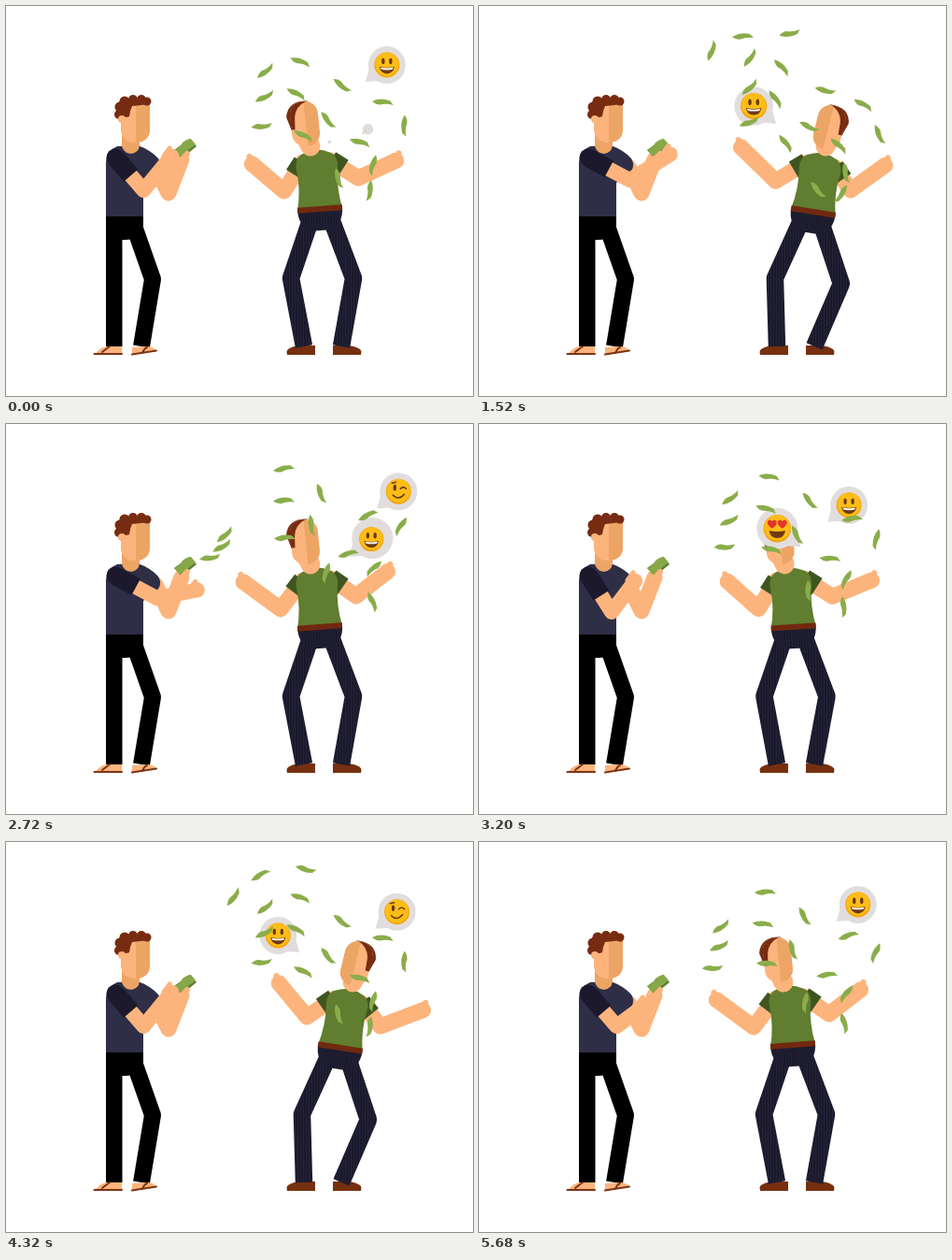
These frames come from a looping animation (500x417 px, 5.76 s). An HTML page:

```html
<!DOCTYPE html>
<html lang="en">
<head>
<meta charset="utf-8">
<title>Money shower</title>
<style>
html, body { margin: 0; width: 100%; height: 100%; overflow: hidden; background: #fff; }
svg { display: block; width: 100vw; height: 100vh; }
</style>
</head>
<body>
<svg viewBox="0 0 500 417" stroke-linecap="round" stroke-linejoin="round">
  <defs>
    <pattern id="stripe" width="3" height="6" patternUnits="userSpaceOnUse">
      <path d="M0 0h3v6h-3z" fill="#1b1a2c"/><path d="M0 0h1v6h-1z" fill="#232238"/>
    </pattern>
    <clipPath id="skull"><rect x="-15" y="-26" width="30" height="48" rx="14"/></clipPath>
  </defs>
  <rect width="500" height="417" fill="#fff"/>
  <g id="payer">
    <path d="M160 172L174 200L188 164" fill="none" stroke="#fcb47c" stroke-width="17"/>
    <path d="M107 225h40v12q-5 13 -19 13h-21z" fill="#000"/>
    <path d="M107 225h17.500v139h-17.500z" fill="#000"/>
    <path d="M138 238L157 292L145 364" fill="none" stroke="#000" stroke-width="18" stroke-linecap="butt"/>
    <path d="M96 372q4-7 12-8h16v8z" fill="#fcb47c"/>
    <path d="M94.500 372h29.500M103 370q5-4 8-6" stroke="#7b3414" stroke-width="2" fill="none"/>
    <path d="M135 372l0-7 17-1q8 1 9 5z" fill="#fcb47c"/>
    <path d="M135 372.500l26-4M146 371q2-5 5-6" stroke="#7b3414" stroke-width="2" fill="none"/>
    <path d="M107 225v-58q0-12 12-17l22-1q14 5 22 14 6 10-5 18l-11 8v36z" fill="#2e2e47"/>
    <path d="M124 138h19v11q-1 8-9 9-8-1-10-8z" fill="#eda566"/>
    <rect x="123" y="104" width="31" height="42" rx="14" fill="#fcb47c"/>
    <path d="M139 104h15v28q0 13-15 14z" fill="#eda566"/>
    <g fill="#772c12">
      <circle cx="121" cy="116" r="5"/><circle cx="122" cy="108" r="5.500"/><circle cx="127" cy="102" r="5.500"/>
      <circle cx="136" cy="100" r="5"/><circle cx="145" cy="100" r="5"/><circle cx="151" cy="102" r="4.500"/>
      <path d="M121 102h32v3l-18 2q-2 4-3 11-4 2-9 0z"/>
    </g>
    <circle cx="124" cy="121" r="4" fill="#fcb47c"/>
    <path d="M180 154l17-12 7 8-16 13z" fill="#5f7d34"/>
    <path d="M180 154q6-2 9-8 5-4 9-4l5 6-17 13z" fill="#86a848"/>
    <path d="M188 164l6-6" stroke="#fcb47c" stroke-width="6"/>
  </g>
  <g id="stage"></g>
</svg>
<script>
const LOOP = 5760, DANCE = 2880, BEAT = 360, SWING = DANCE / 5, STEP = 80;
const SKIN = '#fcb47c', SHADE = '#eda566', GREEN = '#8aad4a', HAIR = '#772c12';
const stage = document.getElementById('stage');
const mod = (a, n) => ((a % n) + n) % n;
const mix = (a, b, k) => a + (b - a) * k;
const clamp = v => Math.max(0, Math.min(1, v));
const turn = (t, period) => 2 * Math.PI * t / period;
const group = (x, y, rest, inner) => `<g transform="translate(${x} ${y}) ${rest}">${inner}</g>`;
const line = (pts, w, col, cap = 'round') =>
  `<path d="M${pts.map(p => p.join(' ')).join('L')}" fill="none" stroke="${col}" stroke-width="${w}" stroke-linecap="${cap}"/>`;
const shape = (d, col) => `<path d="${d}" fill="${col}"/>`;
const dot = (x, y, r, col) => `<circle cx="${x}" cy="${y}" r="${r}" fill="${col}"/>`;
const toward = (a, b, d) => {
  const k = d / Math.hypot(b[0] - a[0], b[1] - a[1]);
  return [mix(a[0], b[0], k), mix(a[1], b[1], k)];
};

// Side to side sway: 0 is far left, 1 is far right
const sway = t => .5 + .5 * Math.tanh(3 * (Math.cos(turn(t, DANCE) - .9 * Math.PI) - .04));

function arm(shoulder, elbow, hand, side) {
  const [x, y] = hand;
  return line([shoulder, elbow, hand], 17, SKIN) + dot(x, y, 8.5, SKIN)
    + line([[x, y], [x + side * 3, y - 8]], 6, SKIN)
    + line([shoulder, toward(shoulder, elbow, 16)], 21, '#3f5520', 'butt');
}

function head(x, y, tilt, yaw) {
  const flip = inner => `<g transform="scale(${yaw} 1)">${inner}</g>`;
  return group(x, y, `rotate(${tilt})`,
    flip(shape('M6-26Q-16-29-19-11L-15 3-9 3V-18z', HAIR))
    + `<g clip-path="url(#skull)">${shape('M-15-26h30v50h-30z', SKIN)}`
    + flip(shape('M1-26h17v50h-17z', SHADE) + shape('M4-26Q-8-22-10-10L-11 3H-20V-26z', HAIR)) + '</g>');
}

function dancer(t) {
  const s = sway(t), bx = 336 + 22 * s, by = 217 + 3 * s, lean = -4 + 13 * s;
  const reach = 83 + 14 * Math.cos(turn(t - 167, SWING)), r = reach - 83;
  const c = Math.cos(lean * Math.PI / 180), n = Math.sin(lean * Math.PI / 180);
  const onBody = (x, y) => [bx + x * c - y * n, by + x * n + y * c];
  const neck = onBody(0, -62), hx = 320 + 55 * s, hy = 128 + 4 * s;
  const k = clamp((s - .45) / .4), yaw = 1 - 2 * k * k * (3 - 2 * k);
  const shoe = (x, dir) => group(x, 0, `scale(${dir} 1)`, shape('M-9 363h17q9 1 13 5 1 2 0 5h-30z', '#76300f'));
  const leg = (hip, knee, foot) => line([hip, knee, [foot, 364]], 18.5, 'url(#stripe)', 'butt');
  const trunk = shape('M-24 0h48q0 16 -12 23h-24q-12-7-12-23z', 'url(#stripe)')
    + shape('M-14-60Q0-67 14-60Q24-56 22-42Q19-22 24 0H-24Q-19-22-22-42Q-24-56-14-60z', '#607d30')
    + shape('M-24-3h48v6h-48z', '#70290f');
  return shoe(322, -1) + shoe(359, 1)
    + leg(onBody(-12, 14), [305 + 12 * s, 291], 319)
    + leg(onBody(12, 14), [372 + 16 * s, 291 + 6 * s], 359)
    + arm(onBody(-15, -51), [bx - 37 + .4 * r, 198 - 11 * s], [bx - 152 + reach, 169 - 18 * s], -1)
    + arm(onBody(15, -51), [bx + 42 + .25 * r, 184 + 13 * s], [bx + 2 + reach, 168 + .8 * r + 9 * s], 1)
    + group(bx, by, `rotate(${lean})`, trunk)
    + line([[hx, hy + 10], [mix(hx, neck[0], .5), 150]], 21, SKIN)
    + head(hx, hy, -6 + 20 * s, yaw);
}

function thrower(t) {
  const a = turn(t - 140, BEAT), out = (.5 + .5 * Math.cos(a)) ** .7;
  const shoulder = [118, 163], elbow = [142 + 24 * out, 201 - 18 * out];
  const x = 167 + 46 * out, y = 168 + 11 * Math.sin(a);
  return line([shoulder, elbow, [x, y]], 16, SKIN) + dot(x, y, 8, SKIN)
    + line([[x - 8, y - 1], [x - 2, y - 9]], 5, SKIN)
    + line([shoulder, toward(shoulder, elbow, 24)], 20, '#1b192b', 'butt') + dot(117, 162, 9.5, '#1b192b');
}

// Where a thrown bill is after each beat
const PATHS = [
  [[218, 143], [298, 122], [343, 159], [372, 215]],
  [[231, 131], [297, 82], [327, 108], [366, 139], [394, 154], [392, 190], [386, 206]],
  [[234, 119], [297, 48], [337, 74], [387, 98], [423, 109], [431, 151]],
  [[224, 98], [252, 42], [297, 28], [350, 30]]
];

function bill(path, i, f) {
  const [x0, y0] = path[i], [x1, y1] = path[i + 1];
  const k = i ? f : f * (2 - f), age = i + f;
  const angle = Math.atan2(y1 - y0, x1 - x0) * 180 / Math.PI + 38 * Math.min(1, age) * Math.cos(Math.PI * age);
  return group(mix(x0, x1, k), mix(y0, y1, k), `rotate(${angle}) scale(1 ${i % 2 ? 1 : -1})`,
    shape('M-11 1Q-3-5 8-3L12 1Q4 0-2 3Q-6 4-11 1z', GREEN));
}

function money(t) {
  const f = mod(t - 200, BEAT) / BEAT;
  // The highest bills fly only while the dancer leans right
  const paths = sway(t) > .2 ? PATHS : PATHS.slice(0, 3);
  return paths.map(p => p.slice(1).map((_, i) => bill(p, i, f)).join('')).join('');
}

const eye = x => `<ellipse cx="${x}" cy="-4" rx="1.7" ry="3.3" fill="#6b3a12"/>`;
const heart = x => shape(`M${x} 0q-5-3-4.500-6.500 2-3.500 4.500-.5 2.500-3 4.500 .5 0.500 3.500-4.500 6.500z`, '#e3342b');
const grin = shape('M-8 2q8 2 16 0-1 7-8 7.500-7-.5-8-7.500z', '#713a12');
const FACE = {
  smile: eye(-4) + eye(4) + grin + shape('M-7 2.800q7 1.500 14 0l-1 2q-6 1.200-12 0z', '#fff'),
  love: heart(-5) + heart(5) + grin,
  wink: eye(-4) + '<path d="M2-3q3-3 6 0M-6 4q6 6 12-1M-7-9l4-1" fill="none" stroke="#6b3a12" stroke-width="1.6"/>'
};

// Face, birth, starting point, sideways drift
const LIFE = 1150;
const BUBBLES = [
  ['wink', -60, 384, 138, 45], ['love', -20, 347, 147, -32],
  ['smile', 1150, 318, 134, -54], ['wink', 2020, 378, 135, 56],
  ['smile', 2490, 390, 143, 8], ['love', 2870, 336, 137, -42],
  ['wink', 3600, 380, 138, 50], ['smile', 3780, 322, 138, -50],
  ['smile', 4810, 367, 138, 44]
];

const pop = u => u < 0 ? 0 : u < 250 ? 1.2 * u / 250 : Math.max(1, 1.2 - (u - 250) / 750);

function bubble(t, [face, born, x, y, drift]) {
  const u = mod(t - born, LOOP);
  if (u >= LIFE) return '';
  const k = 1 - (1 - u / LIFE) ** 1.5, fade = clamp((LIFE - u) / 200), side = Math.sign(-drift);
  const size = pop(u) * Math.min(1, fade * 3), inner = clamp(u / 250) ** 1.5;
  return `<g opacity="${fade}">` + group(x + drift * k, y - (72 + drift / 5) * k, `scale(${size})`,
    dot(0, 0, 20, '#e1dddd') + shape(`M${side * 19} 4L${side * 23} 18 ${side * 8} 17z`, '#e1dddd')
    + group(side * 8 * (1 - inner), 8 * (1 - inner), `scale(${inner})`,
      dot(0, 0, 13.5, '#f5a30b') + dot(0, -.7, 12.5, '#fdbd16') + FACE[face])) + '</g>';
}

function draw(now) {
  const t = Math.floor((now % LOOP) / STEP) * STEP;
  stage.innerHTML = thrower(t) + dancer(t % DANCE) + BUBBLES.map(b => bubble(t, b)).join('') + money(t);
}

const start = performance.now();
function tick(now) {
  draw(Math.max(0, now - start));
  requestAnimationFrame(tick);
}
draw(0);
requestAnimationFrame(tick);
</script>
</body>
</html>
```
